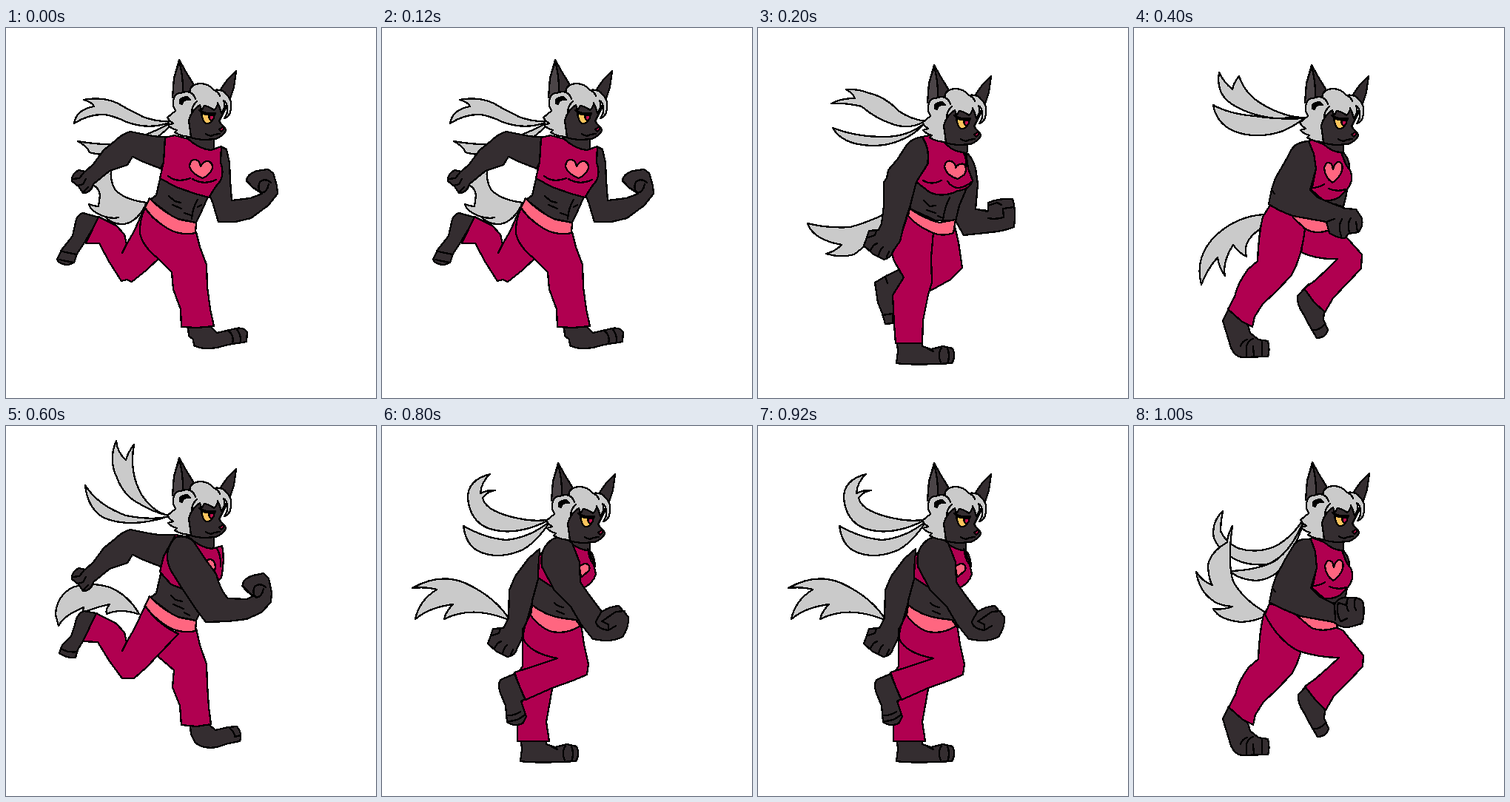
An HTML page that plays this animation: 500 by 500 pixels, repeating every 1200 ms.

```html
<!DOCTYPE html>
<html lang="en">
<head>
<meta charset="utf-8">
<title>Run cycle</title>
<style>
html, body { margin: 0; width: 100%; height: 100%; overflow: hidden; background: #fff; }
svg { display: block; width: 100vw; height: 100vh; }
path { stroke: #000; stroke-width: 2.3; stroke-linejoin: round; stroke-linecap: round; }
.pose { visibility: hidden; }
</style>
</head>
<body>
<svg id="stage" viewBox="0 0 500 500" shape-rendering="crispEdges"></svg>
<script>
const fills = {
  fur: '#342d30', ear: '#4b4447', hair: '#cacaca', cloth: '#b00050',
  pink: '#ff6680', eye: '#ffc45c', iris: '#c00f4e', ink: '#000', line: 'none'
};
const part = (fill, d) => `<path fill="${fills[fill]}" d="${d}"/>`;
const shift = (x, y, art) => `<g transform="translate(${x} ${y})">${art}</g>`;
const fur = d => part('fur', d);
const hair = d => part('hair', d);
const cloth = d => part('cloth', d);
const pink = d => part('pink', d);
const line = d => part('line', d);

const head =
  fur('M225,94L227,68L234,43L243,59L257,82L250,98Z') +
  part('ear', 'M225,94L227,68L234,45Q240,66 239,92Z') +
  fur('M286,94L290,83L299,70L311,58L308,80L302,98Z') +
  fur('M247,106L246,147Q258,151 270,151L283,150Q292,147 297,139Q297,135 291,130L288,126L297,108L290,90L255,90Z') +
  part('eye', 'M264,114Q271,119 281,117L280,123Q276,130 270,129Q265,125 264,114Z') +
  part('iris', 'M275,118L281,117Q282,124 277,125Q273,122 275,118Z') +
  part('ink', 'M261,111Q270,117 283,115L282,118Q270,119 261,111Z') +
  part('iris', 'M288,137L294,133Q296,137 291,140Z') +
  line('M270,143Q277,148 281,144L289,143') +
  hair('M226,105Q225,88 236,88Q243,85 248,87Q249,76 262,75Q274,75 281,84Q293,82 298,90Q306,97 304,110Q302,121 295,122Q300,116 299,107Q298,100 294,98Q298,106 291,115Q289,107 286,101Q286,107 281,111Q275,106 268,105L263,113Q264,108 262,104Q250,112 247,125L250,147Q238,147 228,141L231,138Q223,136 219,131L226,129Q221,126 218,121Q224,116 229,112Z') +
  part('ink', 'M235,102Q233,94 245,93L249,97Q240,95 238,103Z') +
  line('M248,87Q254,89 256,96M281,84Q287,86 289,92M251,113Q252,104 258,99');

const neck = fur('M247,144L245,153Q262,168 278,167L281,163L281,148Z');

// Parts shared by the two wide strides
const rearArm = fur('M229,147L206,147L193,145L168,140Q157,143 148,152L132,165L118,184L107,194L98,192Q88,198 89,207L98,214L104,223Q115,223 118,211L140,193L164,185L171,174L186,181L209,190Z') +
  line('M90,204L99,203L105,196M97,213L104,211L108,204M104,222L111,215');
const belly = fur('M209,200L203,226L195,232L228,257L257,263L265,246L273,228L245,210Z');
const band = pink('M194,230Q213,250 235,259L257,263L256,277Q238,281 220,272Q200,260 188,243Z');
const fist = line('M358,209Q350,202 343,208Q339,217 345,223Q353,222 355,211M326,207L333,215L346,223');

// Parts shared by the two push-off poses
const pushLeg = cloth('M185,238L174,255Q168,282 167,315L154,326Q140,345 136,363L127,380L145,396L160,404L163,390L174,373L192,356L213,334Q227,308 231,272L215,250Z');
const pushFoot = fur('M128,379L120,396L125,412L131,432Q136,444 146,445L181,444Q184,436 181,423L168,421L157,412L154,402Z') +
  line('M144,430Q146,423 153,421M152,444L152,430Q155,421 161,420M162,444L161,430M173,444L173,424');
const hoverFoot = fur('M236,346L221,362Q220,374 228,385L237,402L247,419Q259,419 262,408L256,394L257,384L250,366Z') +
  line('M241,408Q250,409 257,401');
const hoverLeg = cloth('M231,271L226,303Q246,313 275,312L261,326L245,341L230,352L243,370L258,384L269,365L288,345L307,325L308,306L281,276L262,270Z');
const vest = cloth('M234,154L240,151L256,157Q268,168 280,168L286,184L293,194Q297,207 288,218L277,229Q268,234 256,233L240,219L246,190L243,170Z') +
  line('M236,216Q248,217 257,211M263,217Q275,222 286,218');
const thinHeart = pink('M268,209Q258,202 257,189Q260,178 267,184L269,191Q272,180 278,181Q284,185 280,196Q275,205 268,209Z');
const farShoulder = fur('M279,165Q291,174 291,188L287,225L283,241L255,238L262,190Z');

// Parts shared by the two passing poses
const flatFoot = fur('M188,426L189,437L187,453Q210,456 262,453Q268,444 263,433L250,430L234,434L222,430L222,426Z') +
  line('M247,452Q242,441 248,432M256,453Q260,443 256,433M229,433L237,437');
const hangFist = line('M149,283L158,280L160,274M152,301Q155,293 161,291M163,308Q164,300 169,296M174,309L177,302');

const poses = [
  hair('M220,126Q205,127 185,120L160,107Q137,91 105,97Q116,100 119,106Q95,110 92,129Q112,116 134,117Q149,120 163,127Q193,138 220,128Z') +
  hair('M220,130Q180,150 150,157Q125,158 97,153Q110,160 113,168Q130,174 160,167Q195,160 221,133Z') +
  hair('M146,187Q130,190 113,211Q125,213 127,226L125,241Q119,241 112,238Q115,249 134,255Q144,266 160,265Q179,261 190,236Q160,232 148,219Q140,207 142,189Z') +
  line('M134,255Q144,258 152,256') +
  fur('M290,160L298,164L302,182L303,206L305,233L330,230L346,224L334,216L325,207Q325,198 339,193L354,191L361,196L366,213L367,224L354,240L331,257L310,262L287,262L279,235L272,220Z') + fist +
  fur('M126,256L104,250Q95,253 94,263L90,281L75,300L69,313Q72,320 84,320L92,317L96,305L106,290Z') +
  line('M76,302L95,306M72,313L91,317') +
  cloth('M187,243L173,275L163,292L160,279L149,267L125,255L108,291L126,291L140,317L156,342L163,340L170,343L190,327L208,310L225,270Z') +
  line('M163,292L157,304') +
  fur('M246,404L247,416L253,421L254,429Q264,435 285,432L300,428L325,424L326,411Q321,404 311,406L285,412L276,403Z') +
  line('M300,409Q309,415 306,427M311,406Q318,414 317,424') +
  belly +
  cloth('M188,243Q200,262 225,274Q240,280 257,276L262,296L271,320L272,350L276,380L281,403L258,405L237,404L236,380L226,353L224,330L205,311Q185,295 181,278Q180,260 188,243Z') + band +
  line('M220,227L228,234L236,236M225,239L237,244M259,232Q252,243 251,258M241,250L250,253M259,242L264,239') +
  neck + rearArm +
  cloth('M215,148L228,145L246,150Q262,164 277,165L291,160L290,182Q295,195 290,206L283,215L274,229L256,224L230,215L208,203L213,181Z') +
  line('M219,200Q231,210 249,203M252,204Q267,213 284,205') +
  pink('M266,203Q249,196 248,186Q249,177 257,178Q262,180 263,187Q266,180 273,180Q280,182 279,190Q276,198 266,203Z') +
  head,

  hair('M226,126Q205,123 190,112Q172,93 150,88Q135,82 119,83Q128,88 131,95Q112,95 99,102Q120,101 140,106Q158,122 185,131Q207,137 226,126Z') +
  hair('M226,128Q202,148 167,147Q132,147 101,135Q111,152 135,157Q168,163 194,151Q212,144 226,128Z') +
  hair('M172,251Q150,262 125,269Q95,271 67,264Q72,281 100,290L113,293Q104,302 92,305Q112,311 130,306L150,290L175,272Z') +
  fur('M280,167Q290,174 294,190L297,211L294,245L311,247L311,236Q325,230 344,231Q349,245 346,269Q330,275 315,276L278,280L265,257L270,225Z') +
  line('M311,240L323,236L329,239M346,242L331,244L332,256Q320,259 311,257M295,245L310,248') +
  fur('M158,344L173,335L190,327L198,337L184,363L182,399L172,400L168,386L162,371Z') +
  line('M172,336L175,345M168,388L182,386') +
  cloth('M265,264L271,290L276,324L260,340L233,355L228,270Z') + flatFoot +
  cloth('M203,250L192,285L181,305L184,315L197,337L182,361L184,400L186,426L222,426L223,395L230,360L235,344L234,310L237,276Z') +
  fur('M214,206L205,244L240,260L267,261L272,240L283,214L245,205Z') +
  pink('M205,244Q225,258 245,263L267,259L264,277Q248,283 232,275Q213,266 203,254Z') +
  line('M224,233L232,241L240,240M228,246L240,250M259,229Q252,243 250,259M243,254L248,256') +
  shift(2, 4, neck) +
  cloth('M222,147L232,145L250,152Q260,166 276,168L281,169L284,190L290,206Q286,218 270,220Q250,230 232,222L214,208L230,183Z') +
  line('M223,206Q235,213 248,206M256,207Q268,225 290,207M278,169Q283,178 281,192') +
  pink('M270,204Q254,199 252,187Q254,178 261,180Q267,182 267,189Q271,182 279,184Q283,191 279,198Z') +
  fur('M222,147Q208,149 201,158L188,178L176,192L174,203L170,208L170,240L167,264L163,273L150,274Q147,284 143,294L155,305L170,313Q181,310 182,302L192,288L197,267L206,239L214,208L229,184Q233,165 222,147Z') + hangFist +
  shift(4, 7, head),

  hair('M230,121Q205,121 175,104Q150,90 142,65Q134,75 133,83Q121,73 115,60Q111,85 127,99Q150,117 190,122Z') +
  hair('M230,122Q195,124 163,119Q128,116 107,104Q111,128 134,139Q164,151 199,140Q216,133 230,122Z') +
  hair('M176,252Q140,254 112,279Q81,308 91,347Q98,327 113,310Q115,325 123,335Q119,317 134,293Q142,304 152,309Q146,288 170,272Z') +
  hoverFoot + hoverLeg + pushFoot + pushLeg +
  pink('M205,240L262,258L264,273Q246,280 231,271L216,257Z') +
  farShoulder + shift(2, 4, neck) + vest + thinHeart +
  fur('M236,153Q219,154 213,164L205,179L191,203L186,218L182,238Q195,247 215,254L260,262L264,277Q274,284 285,284L290,278L303,276Q310,269 308,257L300,245L286,244L270,238L248,229L238,219L246,190L243,170Z') +
  line('M186,219L190,224M260,262L271,258M280,281Q275,268 281,258M291,277Q288,262 293,257M302,275L300,262M285,244L272,238') +
  shift(6, 7, head),

  hair('M220,121Q200,117 184,94Q166,64 173,25Q165,35 162,46Q150,35 149,20Q138,46 150,70Q159,95 182,106Q200,117 220,121Z') +
  hair('M220,122Q198,128 162,121Q124,107 107,80Q110,111 132,124Q168,139 220,122Z') +
  hair('M180,254Q165,228 140,218Q115,210 90,218Q68,230 67,255L71,270Q78,256 105,245L103,253Q120,245 140,241Q134,248 136,254Q155,246 178,254Z') +
  fur('M122,253L105,250Q95,254 93,269L88,284L76,296L72,307Q82,314 94,313L97,302L104,291Z') +
  line('M76,302Q86,307 96,305') +
  fur('M249,405L250,417L256,428Q266,437 285,434L300,429L316,426Q320,416 312,406L300,407L283,411L275,404Z') +
  line('M302,408Q310,415 309,420L317,418') +
  cloth('M257,274L262,296L271,322L272,350L274,380L277,403L258,406L237,404L235,378L225,353L227,330L205,311L230,275Z') +
  belly +
  cloth('M188,243L173,275L163,292L160,279L149,267L122,253L104,291L124,292L140,318L157,341L173,341L190,326L205,310L233,281Q205,268 188,243Z') +
  line('M163,292L157,304') + band +
  line('M223,229L229,235L238,237M226,241L240,247M241,252L248,256') +
  neck + rearArm +
  cloth('M229,147L247,150Q262,164 278,166L292,162Q296,180 291,205L275,218L246,223L223,214L208,197L213,176Z') +
  line('M284,164Q291,174 290,190') +
  pink('M276,202L265,190Q268,180 277,180Q285,184 282,196Z') +
  fur('M230,150Q245,147 254,157L270,181L284,200Q290,223 300,233L326,234L333,230L320,216Q319,207 334,202L348,199L355,206L359,225L358,238L345,252L325,261L300,264L270,265L257,248L237,218L222,194Q211,167 230,150Z') +
  shift(-7, 9, fist) + head,

  hair('M228,126Q205,131 172,122Q139,113 136,97Q143,88 153,87Q143,86 133,91Q134,76 146,65Q115,73 116,98Q119,128 143,138Q180,151 228,126Z') +
  hair('M228,128Q200,151 168,154Q140,152 110,135Q113,160 130,169Q155,181 186,169Q206,161 228,128Z') +
  hair('M173,263Q155,232 112,212Q78,198 41,219Q60,217 74,221Q50,236 45,261Q64,245 96,241Q86,251 84,261Q110,248 140,253Q158,256 173,263Z') +
  fur('M213,166L198,179L180,203L172,222L171,260L164,273L150,274Q147,284 143,294L155,305L170,312Q181,309 182,302L190,285L196,263L203,238L215,210Z') + hangFist +
  flatFoot +
  cloth('M198,260L190,275L190,325L182,335L190,370L183,398L183,426L226,426L222,400L230,355L240,315Z') +
  fur('M179,335L160,343Q156,350 160,361L167,378L169,400Q178,407 190,402L195,393L188,372L193,369L186,352Z') +
  line('M169,391Q178,392 187,386M170,399Q184,399 193,390') +
  cloth('M200,256Q190,272 191,288Q200,307 237,314Q208,324 179,333L186,352L194,370L230,354L258,344L277,336L279,322L273,295L269,268Z') +
  fur('M212,203L203,236L202,245Q230,262 268,266L265,240L240,215Z') +
  pink('M203,242Q220,256 245,260L262,262L268,270Q248,283 226,277Q210,269 201,256Z') +
  line('M233,239Q237,244 245,245M236,250L246,254') +
  shift(0, 4, neck) +
  fur('M278,166Q287,172 288,190L280,192Z') +
  cloth('M232,153L247,152Q265,168 279,168L285,182L289,200Q286,212 272,219L250,222L229,217L211,205L212,176Z') +
  line('M279,168Q279,178 285,186') +
  pink('M270,204L265,194Q268,186 276,186Q282,188 280,195Z') +
  fur('M232,152Q245,148 257,158L267,184L268,211L279,227L297,251Q307,244 320,243L333,258Q334,272 325,285Q312,291 300,290L285,288L269,268L255,244L233,222L216,190Q212,164 232,152Z') +
  line('M289,264L297,250M289,264Q290,274 306,276L306,268L297,264L316,251M306,276L316,270M316,251L328,250') +
  shift(4, 7, head),

  hair('M232,121Q215,150 190,163Q165,173 140,165Q122,155 117,142Q117,128 120,115Q104,130 108,152Q114,165 125,172Q145,190 180,187Q212,175 232,121Z') +
  hair('M232,123Q215,165 190,183Q165,195 130,196Q140,207 165,209Q190,207 205,185Q222,155 232,123Z') +
  hair('M178,252Q148,235 134,210Q126,185 133,135Q126,148 126,157Q101,172 100,190Q101,208 106,215Q92,210 84,197Q88,222 104,234Q114,243 133,244Q118,249 107,247Q115,262 145,265Q165,264 178,256Z') +
  shift(1, 1, hoverFoot) + pushFoot +
  shift(1, 0, pushLeg) +
  cloth('M183,240L177,255Q195,290 222,304Q250,313 277,313L263,326L246,341L231,352L245,370L259,384L270,365L290,345L309,325L310,310L282,276L220,250Z') +
  pink('M215,252L232,258L272,262L275,272Q255,279 240,273Z') +
  farShoulder + shift(2, 4, neck) + shift(1, 0, vest) + shift(1, 0, thinHeart) +
  fur('M239,153Q220,151 214,164L205,179L192,203L187,218L183,238Q198,247 225,257L270,265Q279,273 290,272L308,267Q312,255 310,240Q308,232 295,232L285,232Q276,232 271,241L250,230L239,219L247,192L245,170Z') +
  line('M187,219L191,224M271,241L272,262M279,264Q272,250 276,239L287,242M289,233Q285,243 290,250M299,233Q296,242 300,249M288,260L280,264') +
  shift(7, 6, head)
];

const stage = document.getElementById('stage');
stage.innerHTML = poses.map(art => `<g class="pose">${art}</g>`).join('');

const hold = 200;
let shown = null;
function tick() {
  const next = stage.children[Math.floor(performance.now() / hold) % poses.length];
  if (next !== shown) {
    if (shown) shown.style.visibility = 'hidden';
    next.style.visibility = 'visible';
    shown = next;
  }
  requestAnimationFrame(tick);
}
tick();
</script>
</body>
</html>
```
